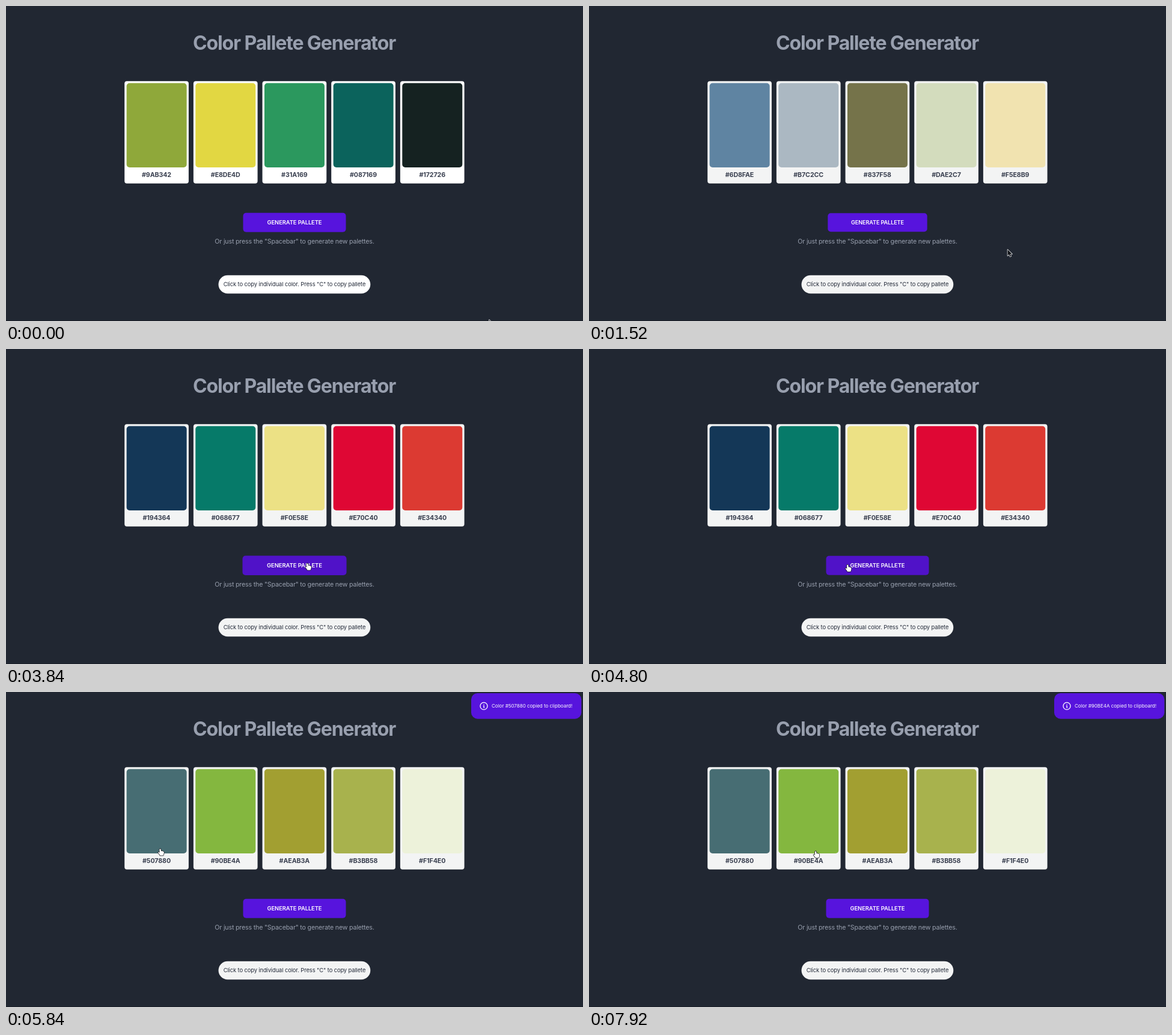
Animation, 960 px wide and 525 px high, one loop 8000 ms. Source, as an HTML page with a canvas:

```html
<!DOCTYPE html>
<html lang="en">
<head>
<meta charset="utf-8">
<title>Color Pallete Generator</title>
<style>
html, body { margin: 0; width: 100%; height: 100%; overflow: hidden; background: #212732; }
canvas { display: block; width: 100%; height: 100%; }
</style>
</head>
<body>
<canvas id="stage" width="960" height="525"></canvas>
<script>
const ctx = document.getElementById('stage').getContext('2d');
const LOOP = 8000, STEP = 80;
const PURPLE = '#5714dd', GREY = '#989fae';

// Each entry is "label fill".
const palettes = [
  { at: 0, colors: ['#9AB342 #8fa83a', '#E8DE4D #e2d742', '#31A169 #2b985e', '#087169 #0b635c', '#172726 #152221'] },
  { at: 1440, colors: ['#6D8FAE #5f84a2', '#B7C2CC #abb8c2', '#837F58 #75734a', '#DAE2C7 #d3dcbd', '#F5E8B9 #f1e3b0'] },
  { at: 3760, colors: ['#194364 #143757', '#068677 #067a69', '#F0E58E #ece185', '#E70C40 #df0734', '#E34340 #dc3a32'] },
  { at: 5040, colors: ['#507880 #476d73', '#90BE4A #84b73f', '#AEAB3A #a29f31', '#B3BB58 #a8b24d', '#F1F4E0 #edf2da'] }
];
const presses = [[1440, 1600], [3300, 3760], [5040, 5180]];
const buttonFills = [
  { at: 0, fill: PURPLE }, { at: 3120, fill: '#4f12c6' }, { at: 3300, fill: '#440fac' },
  { at: 3760, fill: '#5012c8' }, { at: 4880, fill: PURPLE }
];
const toasts = [
  { from: 5840, to: 6640, color: '#507880' },
  { from: 7440, to: LOOP, color: '#90BE4A' }
];
// time, x, y of the pointer's hot spot
const path = [
  [0, 804, 523], [560, 696.5, 406], [2520, 696.5, 406], [3200, 501.5, 358], [4400, 501.5, 358],
  [4960, 412.5, 361], [5200, 412.5, 361], [5680, 256.5, 262], [6960, 256.5, 262], [7360, 377, 266]
];
const arrow = [0, 0, 0, 10.3, 2.4, 8.1, 4, 11.8, 5.7, 11, 4.1, 7.5, 7.4, 7.4];
const hand = [0, -.8, 1, -.3, 1.6, 3.2, 3.2, 3, 4.7, 3.6, 6, 4.3, 6.4, 5.6, 5.8, 8.6, 5, 10.6,
  0, 10.6, -1.4, 8.3, -3.6, 5.6, -2.8, 4.6, -.9, 5.8, -1.2, .2];

const current = (list, t) => list.filter(item => item.at <= t).pop();
const smooth = u => u * u * (3 - 2 * u);
const cardX = i => 197.2 + i * 114.67;

function box(x, y, w, h, r, fill) {
  ctx.beginPath();
  ctx.roundRect(x, y, w, h, r);
  ctx.fillStyle = fill;
  ctx.fill();
}

function text(str, x, y, weight, size, fill, spacing = 0, align = 'center') {
  ctx.font = `${weight} ${size}px Inter, sans-serif`;
  ctx.letterSpacing = spacing + 'px';
  ctx.textAlign = align;
  ctx.fillStyle = fill;
  ctx.fillText(str, x, y);
}

function polygon(points, x, y, fill, stroke, width) {
  ctx.beginPath();
  for (let i = 0; i < points.length; i += 2) ctx.lineTo(x + points[i], y + points[i + 1]);
  ctx.closePath();
  ctx.lineJoin = 'round';
  ctx.lineWidth = width;
  ctx.strokeStyle = stroke;
  ctx.stroke();
  ctx.fillStyle = fill;
  ctx.fill();
}

function pointerAt(t) {
  const next = path.findIndex(p => p[0] > t);
  if (next < 0) return path[path.length - 1].slice(1);
  const [a, b] = [path[next - 1], path[next]];
  const u = smooth((t - a[0]) / (b[0] - a[0]));
  return [a[1] + (b[1] - a[1]) * u, a[2] + (b[2] - a[2]) * u];
}

// Held buttons shrink, then pop past full size on release.
function buttonScale(t) {
  for (const [down, up] of presses) {
    if (t >= down && t < up) return .967;
    const u = (t - up) / 250;
    if (u >= 0 && u < .4) return .98 + .1 * u;
    if (u >= .4 && u < 1) return 1.02 - .02 * (u - .4) / .6;
  }
  return 1;
}

function drawCards(t, paper) {
  current(palettes, t).colors.forEach((entry, i) => {
    const [label, fill] = entry.split(' ');
    const x = cardX(i);
    box(x, 125.3, 106.7, 170.5, 4, paper);
    box(x + 3.4, 128.5, 100, 140.5, 5, fill);
    text(label, x + 53.3, 285, 700, 10.67, '#3a4050', -.1);
  });
}

function drawButton(t) {
  const s = buttonScale(t);
  ctx.save();
  ctx.translate(480, 360.8);
  ctx.scale(s, s);
  box(-85.5, -16, 171, 32, 5, current(buttonFills, t).fill);
  text('GENERATE PALLETE', 0, 3, 600, 9.33, '#fff', -.05);
  ctx.restore();
}

function drawToast(t) {
  const toast = toasts.find(n => t >= n.from && t < n.to);
  if (!toast) return;
  box(774, 2, 183.3, 42.7, 10.5, PURPLE);
  ctx.strokeStyle = '#fff';
  ctx.lineWidth = 1.3;
  ctx.beginPath();
  ctx.arc(795, 23.4, 6, 0, Math.PI * 2);
  ctx.moveTo(794.2, 23);
  ctx.lineTo(795.1, 23);
  ctx.lineTo(795.1, 26);
  ctx.lineTo(796, 26);
  ctx.stroke();
  box(794.3, 20, 1.4, 1.4, .7, '#fff');
  text(`Color ${toast.color} copied to clipboard!`, 808, 26.3, 400, 8, '#fff', 0, 'left');
}

function drawPointer(t) {
  const [x, y] = pointerAt(t);
  const onButton = Math.abs(x - 480) < 85 && Math.abs(y - 361) < 16;
  const onCard = y > 125 && y < 296 && [0, 1, 2, 3, 4].some(i => x > cardX(i) && x < cardX(i) + 106.7);
  if (onButton || onCard) polygon(hand, x, y, '#fff', '#15171c', 1.4);
  else polygon(arrow, x, y, '#111318', '#e8e9eb', 1.5);
}

function draw(t) {
  const paper = t < 1440 ? '#fff' : '#f3f4f4';
  ctx.fillStyle = '#212732';
  ctx.fillRect(0, 0, 960, 525);
  ctx.fillStyle = '#1a1e27';
  ctx.fillRect(0, 524, 960, 1);
  text('Color Pallete Generator', 479.5, 73.3, 700, 32, GREY, -1.12);
  drawCards(t, paper);
  drawButton(t);
  text('Or just press the "Spacebar" to generate new palettes.', 480, 396.4, 400, 10.67, GREY, -.18);
  box(353.5, 448.7, 252.8, 30.6, 15.3, paper);
  text('Click to copy individual color. Press "C" to copy pallete', 480, 467.4, 400, 9.33, '#222938', -.09);
  drawToast(t);
  drawPointer(t);
}

const start = performance.now();
function tick() {
  const t = (performance.now() - start) % LOOP;
  draw(Math.floor(t / STEP) * STEP);
  requestAnimationFrame(tick);
}
tick();
</script>
</body>
</html>
```
